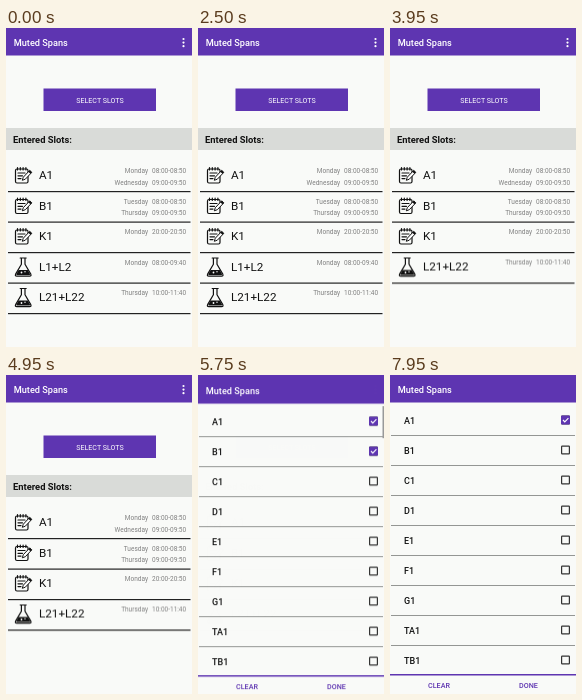
An HTML page for the animation above (8 s loop, 186 px wide and 319 px high).

```html
<!DOCTYPE html>
<html lang="en">
<head>
<meta charset="utf-8">
<title>Slot picker</title>
<style>
  html, body { margin: 0; width: 100%; height: 100%; overflow: hidden; background: #f9faf8; }
  svg { display: block; width: 100vw; height: 100vh; font-family: Roboto, sans-serif; }
  .title { font-size: 9.2px; font-weight: 500; fill: #fff; }
  .button { font-size: 7.1px; fill: #fff; text-anchor: middle; }
  .heading { font-size: 9.4px; font-weight: 700; fill: #111; }
  .slot { font-size: 11.7px; fill: #111; }
  .day, .time { font-size: 6.5px; fill: #808080; }
  .day { text-anchor: end; }
  .option { font-size: 9px; fill: #111; font-weight: 500; }
  .action { font-size: 7.2px; font-weight: 500; fill: #5e35b1; text-anchor: middle; }
  .ink { fill: none; stroke: #111; stroke-width: 1.2; stroke-linejoin: round; stroke-linecap: round; }

  .removed, .raised, .unchecked, .scrollbar, #picker, #slide { animation: 8s linear infinite; }
  .removed { animation-name: remove; }
  .raised { animation-name: raise; }
  .unchecked { animation-name: uncheck; }
  .scrollbar { animation-name: scrollbar; }
  #picker { animation-name: appear; }
  #slide { animation-name: slide; }

  @keyframes remove {
    0%, 45.62% { opacity: 1; }
    45.63%, 100% { opacity: 0; }
  }
  @keyframes raise {
    0%, 45.62% { transform: translateY(0); }
    45.63%, 100% { transform: translateY(-30.5px); }
  }
  @keyframes appear {
    0% { opacity: 0; }
    69.725% { opacity: 0; animation-timing-function: cubic-bezier(.25, 1, .5, 1); }
    72.225%, 100% { opacity: 1; }
  }
  @keyframes slide {
    0% { transform: translateY(29px); }
    69.725% { transform: translateY(29px); animation-timing-function: cubic-bezier(.22, 1, .36, 1); }
    74.1%, 100% { transform: translateY(0); }
  }
  @keyframes scrollbar {
    0%, 85% { opacity: 1; }
    88.1%, 100% { opacity: 0; }
  }
  @keyframes uncheck {
    0%, 91.2% { opacity: 1; }
    92%, 100% { opacity: 0; }
  }
</style>
</head>
<body>
<svg viewBox="0 0 186 319" preserveAspectRatio="none">
  <defs>
    <g id="note">
      <rect class="ink" x="9.5" y="8" width="12.5" height="14" rx="1.5"/>
      <path class="ink" d="M11.5 6.5v2.5M14.3 6.5v2.5M17.1 6.5v2.5M19.9 6.5v2.5"/>
      <path class="ink" stroke-width=".8" d="M12 12h7M12 14.8h4.5M12 17.6h3"/>
      <path d="M16.3 19.3l1-3.1 6.4-6.8 2.1 2-6.5 6.8z" fill="#fff" stroke="#111"/>
      <path d="M22.3 10.8l1.5-1.6 2.1 2-1.5 1.6z" fill="#111"/>
    </g>
    <g id="flask">
      <path class="ink" d="M14.2 5.5h6M15.4 5.7v6L9.6 21.6q-.8 2 1.2 2h12.8q2 0 1.2-2L19 11.7v-6"/>
      <path d="M12.6 17.5h9.2l2.2 4.1q.4 1-.6 1H11q-1 0-.6-1z" fill="#111"/>
      <circle cx="15.5" cy="20" r=".9" fill="#fff"/>
      <circle cx="19" cy="19.3" r=".7" fill="#fff"/>
    </g>
  </defs>

  <g id="home">
    <rect width="186" height="319" fill="#f9faf8"/>
    <rect width="186" height="27.5" fill="#5e35b1"/>
    <text class="title" x="7.7" y="18">Muted Spans</text>
    <g fill="#fff">
      <circle cx="177.5" cy="11" r="1.1"/>
      <circle cx="177.5" cy="14.6" r="1.1"/>
      <circle cx="177.5" cy="18.2" r="1.1"/>
    </g>
    <rect x="37.5" y="60.5" width="112.5" height="22.5" fill="#5e35b1"/>
    <text class="button" x="94" y="74.5">SELECT SLOTS</text>
    <rect y="100" width="186" height="22" fill="#d9dbd8"/>
    <text class="heading" x="7" y="114.5">Entered Slots:</text>
    <g id="slots"></g>
  </g>

  <g id="picker">
    <g id="slide">
      <rect width="186" height="319" fill="#f9faf8"/>
      <rect width="186" height="27.5" fill="#5e35b1"/>
      <text class="title" x="7.7" y="18">Muted Spans</text>
      <g id="options"></g>
      <rect class="scrollbar" x="184.5" y="30" width="1.5" height="32" fill="#999"/>
      <rect y="299" width="186" height="1.5" fill="#5e35b1"/>
      <text class="action" x="49" y="313">CLEAR</text>
      <text class="action" x="138.5" y="313">DONE</text>
    </g>
  </g>
</svg>
<script>
  const slots = [
    ["A1", "note", ["Monday", "08:00-08:50"], ["Wednesday", "09:00-09:50"]],
    ["B1", "note", ["Tuesday", "08:00-08:50"], ["Thursday", "09:00-09:50"]],
    ["K1", "note", ["Monday", "20:00-20:50"]],
    ["L1+L2", "flask", ["Monday", "08:00-09:40"]],
    ["L21+L22", "flask", ["Thursday", "10:00-11:40"]]
  ];
  const slotClass = { "L1+L2": "removed", "L21+L22": "raised" };
  const options = ["A1", "B1", "C1", "D1", "E1", "F1", "G1", "TA1", "TB1"];

  const text = (type, x, y, value) => `<text class="${type}" x="${x}" y="${y}">${value}</text>`;

  const slotRow = ([name, icon, ...times], i) => `
    <g transform="translate(0 ${133 + 30.5 * i})"><g class="${slotClass[name] || ""}">
      <use href="#${icon}"/>
      ${text("slot", 33, 18.3, name)}
      ${times.map(([day, time], j) =>
        text("day", 142, 12 + 11.7 * j, day) + text("time", 146, 12 + 11.7 * j, time)).join("")}
      <rect x="2" y="30" width="182.5" height="1.2" fill="#222"/>
    </g></g>`;

  const tick = extra => `<g class="${extra}">
      <rect x="171" y="10.5" width="9" height="9" rx="1" fill="#5e35b1"/>
      <path d="M173 15l1.8 1.9 3.6-3.8" fill="none" stroke="#fff" stroke-width="1.1"/>
    </g>`;

  const optionRow = (name, i) => `
    <g transform="translate(0 ${30 + 30 * i})">
      ${text("option", 14, 18.5, name)}
      <rect x="171.6" y="11.1" width="7.8" height="7.8" rx=".6" fill="none" stroke="#333" stroke-width="1.2"/>
      ${i < 2 ? tick(i ? "unchecked" : "") : ""}
      ${i < 8 ? '<rect x="1" y="30" width="184" height="1" fill="#949694"/>' : ""}
    </g>`;

  document.getElementById("slots").innerHTML = slots.map(slotRow).join("");
  document.getElementById("options").innerHTML = options.map(optionRow).join("");
</script>
</body>
</html>
```
